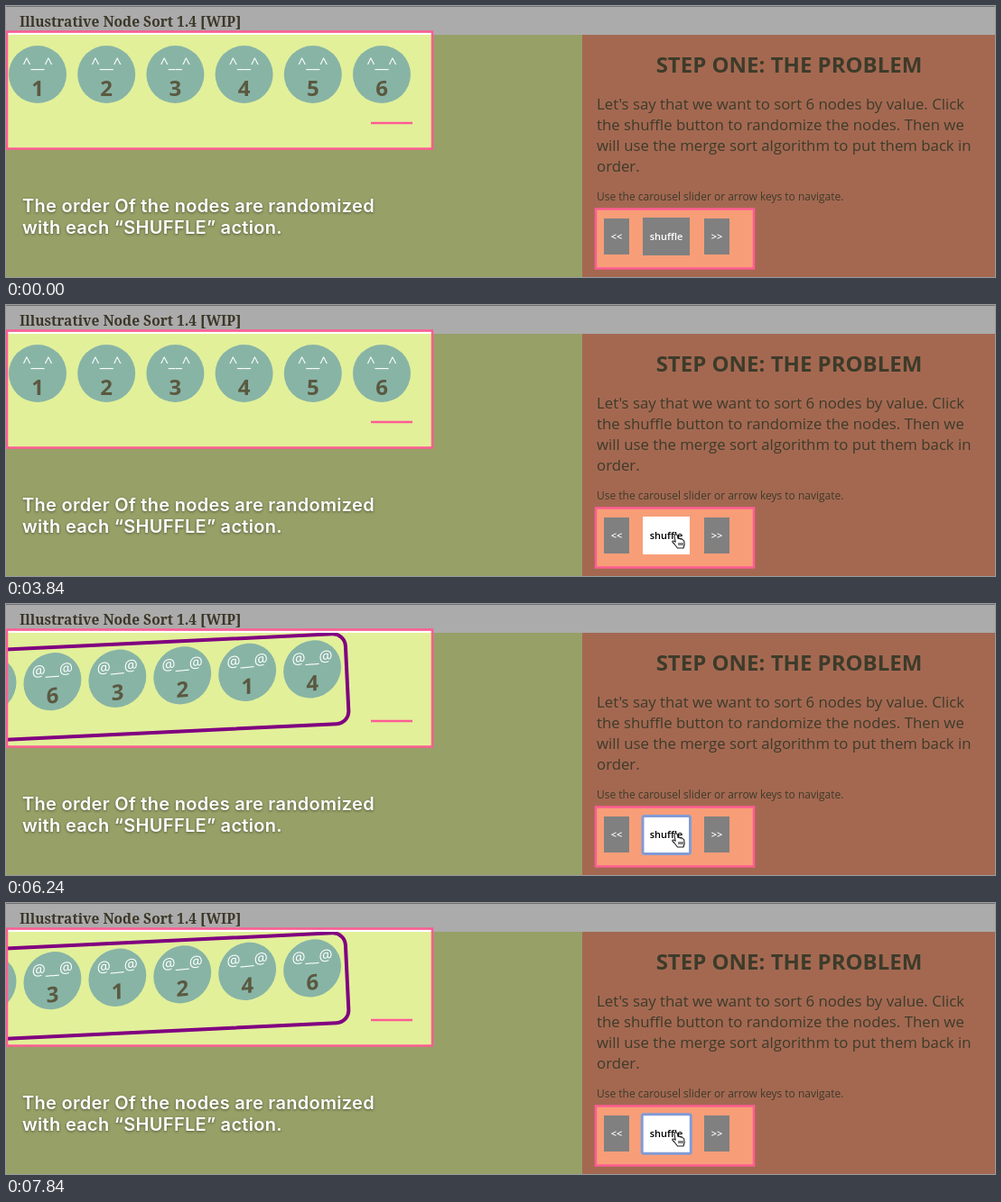
These frames come from a looping animation (1095x301 px, 8 s). An HTML page:

```html
<!DOCTYPE html>
<html lang="en">
<head>
<meta charset="utf-8">
<title>Node shuffle</title>
<style>
  html, body { margin: 0; width: 100%; height: 100%; overflow: hidden; }
  svg { display: block; width: 1095px; height: 301px; font-family: "Open Sans", sans-serif; }
  .mid { text-anchor: middle; }
  .face { font-size: 16.8px; fill: #fff; }
  .digit { font-size: 24px; font-weight: 700; fill: #5a5940; }
  .copy { font-size: 16.8px; }
  .label { font-size: 11px; font-weight: 600; }
  .caption {
    font: 600 20px Inter, sans-serif; letter-spacing: .3px; fill: #fff;
    text-shadow: 0 1px 3px rgba(0, 0, 0, .45);
  }
  .mark { fill: none; stroke: #ff5c93; stroke-width: 2.5; }
</style>
</head>
<body>
<svg viewBox="0 0 1095 301">
  <defs><clipPath id="panel"><rect y="32" width="638" height="269"/></clipPath></defs>
  <rect width="638" height="301" fill="#e2f09a"/>
  <g clip-path="url(#panel)">
    <g id="row">
      <rect id="frame" x="2" y="43" width="436" height="100" rx="14" fill="none" stroke="#800080" stroke-width="4"/>
    </g>
  </g>
  <path d="M0 32H638V301H0ZM1 32V159H472V32Z" fill-rule="evenodd" fill-opacity=".333"/>

  <rect width="1095" height="32" fill="#ababab"/>
  <rect width="1095" height="1" fill="#707070"/>
  <text x="15" y="23" font-size="15.5" font-weight="700" fill="#3b3729" style="font-family:'Noto Serif',serif">Illustrative Node Sort 1.4 [WIP]</text>
  <rect x="2" y="29.5" width="470" height="2.5" fill="#fff"/>
  <rect class="mark" x="1" y="28.5" width="471" height="130"/>
  <path class="mark" d="M404 130H450"/>
  <text class="caption" x="18" y="229">The order Of the nodes are randomized</text>
  <text class="caption" x="18" y="253">with each “SHUFFLE” action.</text>

  <rect x="638" y="32" width="457" height="269" fill="#a46851"/>
  <g fill="#3d3b2a">
    <text class="mid" x="867" y="74" font-size="24" font-weight="700">STEP ONE: THE PROBLEM</text>
    <g class="copy">
      <text x="654" y="115">Let's say that we want to sort 6 nodes by value. Click</text>
      <text x="654" y="138">the shuffle button to randomize the nodes. Then we</text>
      <text x="654" y="161">will use the merge sort algorithm to put them back in</text>
      <text x="654" y="184">order.</text>
    </g>
    <text x="654" y="216" font-size="12">Use the carousel slider or arrow keys to navigate.</text>
  </g>
  <rect class="mark" x="653" y="225.5" width="175" height="66" style="fill:#f79e78"/>
  <g id="buttons"></g>
  <rect id="ring" rx="2" fill="none" stroke="#819bd6" stroke-width="3"/>
  <path id="hand" fill="#fff" stroke="#222" stroke-width="1.1" stroke-linejoin="round"
    d="M3.5 1.2C4.6 .3 5.8 .8 6.2 2L7 5.5C8 4.8 9 5.2 9.4 6C10.4 5.5 11.4 6 11.7 6.8C12.8 6.6 13.6 7.2 13.8 8.4L14.2 12L13 16H6.5L3 11.5L.8 9.2C.6 8 2 7.6 3.2 8.6L4.2 9.2L3 3ZM8 10V13M10 10V13M12 10V13"/>
</svg>
<script>
const LOOP = 8000, STEP = 160, SHAKE = 960, FADE = 500;
const CLICKS = [
  { at: 4326, order: '415236' },
  { at: 5798, order: '563214' },
  { at: 7398, order: '531246' }
];
// [position in the shake, sway in percent of the width]; tilt is a fifth of it
const SWAY = [[0, 0], [.15, -25], [.3, 20], [.45, -15], [.6, 10], [.75, -5], [1, 0]];
// [position in the shake, skew in degrees]
const JELLY = [[0, 0], [1 / 9, 0]];
for (let i = 2; i < 9; i++) JELLY.push([i / 9, -12.5 * (-.5) ** (i - 2)]);
JELLY.push([1, 0]);
const HAND_X = [[2400, 737], [2860, 735], [3000, 669], [3140, 669], [3400, 737]];
const HAND_Y = [[2400, 254], [2860, 253], [3000, 251], [3140, 251], [3400, 254]];

const $ = id => document.getElementById(id);

function add(parent, tag, attrs, text = '') {
  const el = document.createElementNS('http://www.w3.org/2000/svg', tag);
  set(el, attrs);
  el.textContent = text;
  parent.appendChild(el);
  return el;
}

function set(el, attrs) {
  for (const k in attrs) el.setAttribute(k, attrs[k]);
}

// cubic-bezier(.25, .1, .25, 1)
function ease(x) {
  if (x <= 0) return 0;
  if (x >= 1) return 1;
  let lo = 0, hi = 1, s;
  for (let i = 0; i < 24; i++) {
    s = (lo + hi) / 2;
    if (.75 * s * (1 - s) + s ** 3 < x) lo = s; else hi = s;
  }
  return .3 * s * (1 - s) ** 2 + 3 * s * s * (1 - s) + s ** 3;
}

function track(keys, t) {
  if (t <= keys[0][0]) return keys[0][1];
  for (let i = 1; i < keys.length; i++) {
    const [t0, v0] = keys[i - 1], [t1, v1] = keys[i];
    if (t < t1) return v0 + (v1 - v0) * ease((t - t0) / (t1 - t0));
  }
  return keys[keys.length - 1][1];
}

const nodes = [...'123456'].map(() => {
  const g = add($('row'), 'g', {});
  add(g, 'circle', { r: 32, fill: '#88b4a6' });
  return {
    g,
    face: add(g, 'text', { class: 'mid face', y: -7.5 }),
    digit: add(g, 'text', { class: 'mid digit', y: 24 })
  };
});

function button(label, x, y, w, h, spells) {
  return {
    spells,
    box: add($('buttons'), 'rect', { x, y, width: w, height: h }),
    text: add($('buttons'), 'text', { class: 'mid label', x: x + w / 2, y: 260 }, label)
  };
}

const buttons = [
  button('<<', 662, 236, 28, 40, [[2955, 3200]]),
  button('shuffle', 705, 235, 52, 42, [[2400, 2920], [3260, LOOP * 2]]),
  button('>>', 773, 236, 28, 40, [])
];

const grey = v => `rgb(${[v, v, v].map(Math.round)})`;

function drawNodes(t, click) {
  const p = click ? (t - click.at) / SHAKE : 1;
  const shaking = p < 1;
  const sway = track(SWAY, p), skew = track(JELLY, p);
  const order = click ? click.order : '123456';
  const face = !click ? '^__^' : shaking ? '@__@' : 'o__o';
  set($('row'), { transform: `translate(${sway * 4.4} 0) rotate(${sway / 5} 220 93)` });
  set($('frame'), { visibility: click ? 'visible' : 'hidden' });
  nodes.forEach((n, i) => {
    const x = click ? 40 + 72 * i : 35 + 76.2 * i, y = click ? 81 : 76;
    set(n.g, { transform: `translate(${x} ${y}) skewX(${skew}) skewY(${skew})` });
    n.face.textContent = face;
    n.digit.textContent = order[i];
  });
}

function drawButtons(t, click) {
  for (const b of buttons) {
    const glow = Math.max(0, ...b.spells.map(([on, off]) =>
      ease((t - on) / FADE) * (1 - ease((t - off) / FADE))));
    set(b.box, { fill: grey(128 + 127 * glow) });
    set(b.text, { fill: grey(255 * (1 - glow)) });
  }
  const grow = click === CLICKS[2] ? .8 : 0;
  set($('ring'), {
    x: 705 - grow, y: 235.5 - grow, width: 52.5 + 2 * grow, height: 42 + 2 * grow,
    visibility: click ? 'visible' : 'hidden'
  });
  set($('hand'), {
    transform: `translate(${track(HAND_X, t)} ${track(HAND_Y, t)})`,
    visibility: t < 2400 ? 'hidden' : 'visible'
  });
}

function draw(t) {
  const click = CLICKS.filter(c => c.at <= t).pop();
  drawNodes(t, click);
  drawButtons(t, click);
}

let start;
function tick(now) {
  start ??= now;
  draw(Math.floor((now - start + 8) / STEP) * STEP % LOOP);
  requestAnimationFrame(tick);
}
draw(0);
requestAnimationFrame(tick);
</script>
</body>
</html>
```
